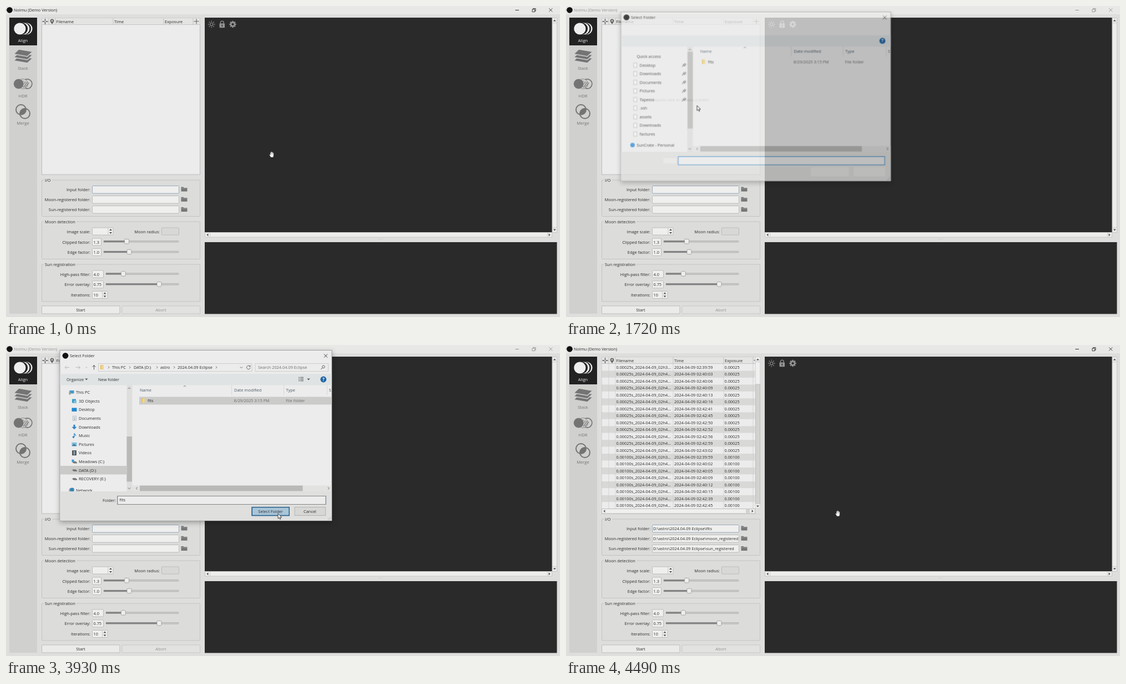
An HTML page for the animation above (5.23 s loop, 998 px wide and 561 px high).

```html
<!DOCTYPE html>
<html lang="en">
<head>
<meta charset="utf-8">
<title>Folder selection</title>
<style>
  html, body { margin: 0; width: 100%; height: 100%; overflow: hidden; background: #dededd; }
  svg { display: block; width: 100vw; height: 100vh; }
  text { font-family: "Open Sans", "Noto Sans", sans-serif; white-space: pre; }
  #dialog { transform-origin: 342px 163px; }
  #frame { filter: drop-shadow(0 3px 5px rgba(0, 0, 0, .3)); }
</style>
</head>
<body>
<svg id="stage" viewBox="0 0 998 561"></svg>
<script>
const LOOP = 5230;
const INK = '#2c2c2c', DIM = '#6c6c6c', LINE = '#bcbcbc', PANE = '#ececec', DARK = '#2a2a2a', BASE = '#dededd', BLUE = '#2f83c5';
const NUM = 7.35;

// Drawing helpers: each returns SVG markup.
const rect = (x, y, w, h, fill, stroke = 'none', extra = '') =>
  `<rect x="${x}" y="${y}" width="${w}" height="${h}" fill="${fill}" stroke="${stroke}" ${extra}/>`;
const box = (x, y, w, h, fill = PANE, stroke = LINE, extra = '') =>
  rect(x + .5, y + .5, w - 1, h - 1, fill, stroke, extra);
const circle = (x, y, r, fill, stroke = 'none', width = 1) =>
  `<circle cx="${x}" cy="${y}" r="${r}" fill="${fill}" stroke="${stroke}" stroke-width="${width}"/>`;
const line = (d, stroke = DIM, width = 1, extra = '') =>
  `<path d="${d}" fill="none" stroke="${stroke}" stroke-width="${width}" ${extra}/>`;
const shape = (d, fill, extra = '') => `<path d="${d}" fill="${fill}" ${extra}/>`;
const text = (x, y, s, fill = INK, size = 7.45, anchor = 'start', extra = '') =>
  `<text x="${x}" y="${y}" fill="${fill}" font-size="${size}" text-anchor="${anchor}" ${extra}>${s}</text>`;
const group = (id, ...parts) => `<g id="${id}">${parts.join('')}</g>`;
const at = (x, y, body, turn = 0) => `<g transform="translate(${x} ${y}) rotate(${turn})">${body}</g>`;
const tri = (x, y, turn, fill = '#555') => at(x, y, shape('M-2.6 1.4L0-1.6 2.6 1.4z', fill), turn);
const chevron = (x, y, turn, size = 2.2, color = DIM) =>
  at(x, y, line(`M${-size} ${size / 2}L0 ${-size / 2} ${size} ${size / 2}`, color), turn);
const cross = (x, y, r, color = INK) => line(`M${x - r} ${y - r}l${2 * r} ${2 * r}m0 ${-2 * r}l${-2 * r} ${2 * r}`, color, .9);
const folder = (x, y) => shape(`M${x} ${y}h4l1 1.4h6v6.6h-11z`, '#777') + line(`M${x + .5} ${y + 2.6}h10`, '#aaa', .6);
const yellowFolder = (x, y) => rect(x - 3, y - 4, 5.5, 8, '#e5c163') + rect(x - 1, y - 3.4, 3.8, 7.6, '#f0d68c');
const rays = (n, r1, r2, width) => Array.from({ length: n }, (_, i) =>
  `<path d="M0 ${-r1}V${-r2}" stroke="#929292" stroke-width="${width}" transform="rotate(${i * 360 / n})"/>`).join('');

function titleBar() {
  return rect(0, 0, 998, 15, '#e8e8e7') + circle(6.5, 7.3, 5.4, '#111') + group('caption',
    text(14, 10.4, 'Nolmu (Demo Version)', INK, 7.4),
    line('M917.5 7.5h6.5', INK),
    line('M948 6h4.6v4.6h-4.6zM949.6 6V4.5h4.5v4.6h-1.4', INK, .9), cross(981.3, 7.3, 3));
}

function sidebar() {
  const gray = '#747474', tab = '#222', y = 140.5;
  const moons = [[37, '#eee'], [34.6, tab], [31.8, '#eee'], [28.6, tab], [25, '#eee']]
    .map(([x, fill]) => circle(x, 41, 10.6, fill)).join('');
  const layer = 'l25 4.2-9.5 8.8-24.5-4.3z';
  const layers = [90, 84, 78].map(top => shape(`M23 ${top}${layer}`, gray, 'stroke="#d0d0cf" stroke-width="1.4"')).join('');
  const hdr = circle(38.3, y, 8.6, 'none', gray, 1.6) + circle(30.5, y, 9, '#d0d0cf', gray, .8)
    + [0, 3, 6, 9].map(i => line(`M${25 + i} ${148 - i * .1}l7-${13 - i * .5}`, gray, 1.1)).join('')
    + circle(22.8, y, 9.3, gray, '#d0d0cf', .8);
  const merge = '<clipPath id="lens"><circle cx="27" cy="187" r="9"/></clipPath>'
    + `<g clip-path="url(#lens)">${circle(34, 194, 9, gray)}</g>`
    + circle(27, 187, 9, 'none', gray, 2) + circle(34, 194, 9, 'none', gray, 2);
  return rect(6, 21, 50, 534, '#d0d0cf') + rect(6, 21, 50, 50, tab) + moons + layers + hdr + merge
    + ['Align', 'Stack', 'HDR', 'Merge'].map((s, i) =>
      text(30.5, 65 + i * 49.8, s, i ? gray : '#eee', 7.6, 'middle')).join('');
}

const columns = [77, 89, 193, 284, 337];
const columnLines = (y, h, color) => columns.map(x => rect(x - .4, y, .8, h, color)).join('');

function fileList() {
  return box(64, 21, 286, 283.5) + rect(64.5, 21.5, 285, 12, '#e4e4e3') + rect(64.5, 33, 285, .8, LINE)
    + columnLines(22, 11.5, LINE)
    + line('M65.5 28h4m2 0h4M70.5 23v4m0 2v4', '#555', 1.3)
    + shape('M83 33c-1.4-2.4-3.4-4.2-3.4-6.2a3.4 3.4 0 0 1 6.8 0c0 2-2 3.8-3.4 6.2z', '#666') + circle(83, 26.8, 1.3, '#e4e4e3')
    + text(90.5, 30.8, 'Filename') + text(195, 30.8, 'Time') + text(286, 30.8, 'Exposure')
    + line('M338.5 27.7h9m-4.5-4.5v9', '#777', 1.3)
    + group('hint', text(207, 172, 'Double-click to browse a folder', '#858585', 7.5, 'middle', 'font-style="italic"'));
}

function loadedRows() {
  const sets = {
    '0.00025': '39:59 40:03 40:06 40:09 40:13 40:16 42:41 42:45 42:50 42:52 42:56 42:59 43:02',
    '0.00100': '39:59 40:02 40:05 40:09 40:12 40:15 42:39 42:45',
  };
  const rows = Object.entries(sets).flatMap(([exposure, times]) => times.split(' ').map(time => [exposure, time]));
  const body = rows.map(([exposure, time], i) => {
    const y = 34 + i * 12.47;
    return rect(64.5, y, 276, 12.5, i % 2 ? '#d8d8d7' : PANE)
      + text(90.5, y + 8.9, `${exposure}s_2024-04-09_02h${time[0]}...`, INK, NUM)
      + text(195, y + 8.9, `2024-04-09 02:${time}`, INK, NUM) + text(285.5, y + 8.9, exposure, INK, NUM);
  }).join('');
  return body + columnLines(34, 261, '#cfcfce')
    + box(64, 295, 277, 9.5, '#f0f0ef') + rect(324, 295.5, 7, 8.5, '#d2d2d1') + tri(69, 299.7, -90) + tri(336, 299.7, 90)
    + box(341, 21, 9, 274, '#d2d2d1') + rect(341.5, 21.5, 8, 49.5, '#f0f0ef') + rect(341.5, 287, 8, 7.5, '#f0f0ef')
    + rect(341.5, 30, 8, .8, LINE) + rect(341.5, 70.5, 8, .8, LINE)
    + tri(345.5, 26, 0) + tri(345.5, 291, 180) + rect(341, 295, 9, 9.5, BASE);
}

const label = (y, s, x = 152) => text(x, y, s, INK, 7.45, 'end');
const field = (y, w, value = '', h = 14, stroke = LINE) =>
  box(155, y, w, h, '#efefee', stroke, 'rx="1"') + text(157.5, y + 10, value, INK, NUM);
const spin = (x, y) => rect(x - 5, y - 6.5, .8, 13, LINE) + tri(x, y - 2.8, 0) + tri(x, y + 3, 180);
const frame = (y, h, title, gap) =>
  box(64, y, 286, h, '#dcdcdb', '#c3c3c2', 'rx="1"') + rect(68, y - 2, gap, 5, BASE) + text(70, y + 3.2, title);
const slider = (x, y, knob) =>
  rect(x, y - 1.3, 311 - x, 2.8, '#c6c6c5', '#aaa', 'stroke-width=".6" rx="1"') + rect(x, y - 1.5, knob - x, 3, '#828282')
  + rect(knob - 4, y - 4.2, 8, 8.4, '#eeeeed', '#999', 'stroke-width=".8" rx="1.5"');

function settings() {
  const folders = ['Input folder:', 'Moon-registered folder:', 'Sun-registered folder:'].map((s, i) =>
    label(334 + i * 18.2, s) + field(324 + i * 18, 157, '', 14.5, i ? LINE : '#9aabb9') + folder(315.5, 326.5 + i * 18.2)).join('');
  return frame(313.5, 66.5, 'I/O', 15) + folders
    + frame(388.5, 68.5, 'Moon detection', 59)
    + label(410, 'Image scale:') + field(399.5, 38.5) + spin(188.5, 406.5)
    + label(410, 'Moon radius:', 277) + box(280, 399.5, 32, 14, '#d8d8d7', LINE, 'rx="1"')
    + label(428.5, 'Clipped factor:') + field(418.5, 17, '1.3') + slider(176, 424.7, 217.5)
    + label(447, 'Edge factor:') + field(437, 17, '1.0') + slider(176, 443.5, 222)
    + frame(465.5, 68, 'Sun registration', 58)
    + label(486.7, 'High-pass filter:') + field(476.5, 21, '4.0') + slider(180, 483, 211.3)
    + label(505.3, 'Error overlay:') + field(495.3, 21, '0.75') + slider(180, 501.8, 276)
    + label(523.8, 'Iterations:') + field(514, 28.5, '10') + spin(178, 521)
    + box(64, 540.5, 141.5, 15, '#ebebea', LINE, 'rx="1"') + text(134.5, 551, 'Start', INK, 7.45, 'middle')
    + box(208.5, 540.5, 141.5, 15, '#e2e2e1', '#c8c8c7', 'rx="1"') + text(279, 551, 'Abort', '#929292', 7.45, 'middle');
}

const loadedPaths = () => ['fits', 'moon_registered', 'sun_registered'].map((s, i) =>
  text(157, 334 + i * 18.2, `D:\\astro\\2024.04.09 Eclipse\\${s}`, INK, 7.33)).join('');

function viewer() {
  return rect(358, 21, 626, 387.5, DARK) + rect(358, 426, 634.5, 129.5, DARK)
    + box(983.5, 21, 9.5, 388, '#ededec', '#c8c8c7') + tri(988.3, 26, 0) + tri(988.3, 404, 180)
    + rect(984, 30, 8.5, .8, '#c8c8c7') + rect(984, 399, 8.5, .8, '#c8c8c7')
    + box(358, 408, 626, 9.5, '#ededec', '#c8c8c7') + tri(363, 412.8, -90) + tri(979, 412.8, 90)
    + rect(367, 408.5, .8, 8.5, '#c8c8c7') + rect(975, 408.5, .8, 8.5, '#c8c8c7')
    + line('M671 420.5h8', '#c4c4c3', 1, 'stroke-dasharray="1 1.5"')
    + at(370.3, 33, rays(8, 4.2, 6.4, 1.2) + circle(0, 0, 2.5, 'none', '#929292', 1.2))
    + rect(384.5, 31.5, 9.6, 7.8, '#929292', 'none', 'rx="1"') + line('M386.4 32v-2a2.9 2.9 0 0 1 5.8 0v2', '#929292', 1.4)
    + circle(389.3, 34.8, 1, DARK) + rect(388.8, 35, 1, 2.4, DARK)
    + at(408.5, 33, rays(8, 3, 6.2, 2.4) + circle(0, 0, 3.4, 'none', '#929292', 2.6));
}

const drive = (x, y) => shape(`M${x - 4} ${y}l2-1.5h4l3 2v1.8h-6z`, '#777');
const page = (x, y) => box(x - 3, y - 4.5, 7, 9, '#f4f4f3', '#b0b0af', 'stroke-width=".8"');
const pin = (x, y) => line(`M${x - 3} ${y + 3}l2.5-2.5m-1-2l3.5 3.5m-2-3l2-2 2 2-2 2z`, '#777', 1.1);

function quickAccess() {
  const names = ['Desktop', 'Downloads', 'Documents', 'Pictures', 'Tapesio', '.ssh', 'assets', 'Downloads', 'factures'];
  return text(125.5, 93.2, 'Quick access') + names.map((s, i) => {
    const y = 106.2 + i * 15.65;
    return page(122.5, y) + text(131, y + 2.7, s) + (i < 5 ? pin(211, y) : '');
  }).join('') + circle(118, 251.5, 4, '#2f8fd8') + text(125.5, 254.4, 'SunCrate - Personal')
    + rect(218, 82, 9.5, 139.5, '#b9b9b8');
}

function thisPc() {
  const icon = [
    (x, y) => rect(x - 4, y - 3.5, 7, 7, '#3f9bc4') + rect(x - 1, y - 1, 5, 5, '#78bfdc'),
    (x, y) => rect(x - 4.5, y - 3.2, 9, 6.5, '#2287cf'),
    (x, y) => page(x, y) + line(`M${x - 1} ${y - 1.5}h3m-3 2h3m-3 2h3`, '#5c8db0', .8),
    (x, y) => shape(`M${x - 1.5} ${y - 4}h3v4h3l-4.5 4.5-4.5-4.5h3z`, BLUE),
    (x, y) => line(`M${x} ${y + 2.5}v-7c0 3 3 2.5 2.7 5`, BLUE, 1.2) + circle(x - 1.5, y + 2.7, 1.8, BLUE),
    (x, y) => rect(x - 4.5, y - 3.2, 9, 6.5, '#82bddb') + shape(`M${x - 4.5} ${y + 3.3}l4-4 5 4z`, '#407a9e'),
    (x, y) => rect(x - 3.8, y - 4.5, 7.6, 9, '#444') + rect(x - 1.8, y - 3.5, 3.6, 7, '#7d9bb0'),
    (x, y) => drive(x, y + 1) + rect(x - 4.5, y - 3.5, 4, 4, '#2f9bdc'), drive, drive,
  ];
  const names = ['3D Objects', 'Desktop', 'Documents', 'Downloads', 'Music', 'Pictures', 'Videos', 'Meadows (C:)', 'DATA (D:)', 'RECOVERY (E:)'];
  const computer = (x, y) => rect(x - 3.5, y - 3.5, 8, 5.5, '#3f9bd0') + rect(x - 4.5, y - 1.5, 3, 5.5, '#999');
  return rect(97.5, 218, 119.5, 15.5, '#cacac9') + computer(118, 85.5) + text(126, 88.3, 'This PC')
    + names.map((s, i) => {
      const y = 101 + i * 15.6;
      return icon[i](123, y) + text(131, y + 2.8, s);
    }).join('')
    + computer(118, 262) + circle(119, 261, 3.5, '#3585b5') + text(126, 265, 'Network')
    + rect(217.5, 165, 9.5, 81.5, '#b9b9b8');
}

function dialogChrome() {
  const crumbs = [[191, 'This PC'], [230, 'DATA (D:)'], [278, 'astro'], [309, '2024.04.09 Eclipse']];
  return line('M114 40.5h-8m3.2-3l-3.2 3 3.2 3M125.5 40.5h8m-3.2-3l3.2 3-3.2 3', '#b9b9b8')
    + chevron(145, 40.5, 180, 1.8, '#b9b9b8') + line('M158.5 44.5v-8m-3 3.2l3-3.2 3 3.2', '#555')
    + box(166, 33, 277.5, 15, PANE, '#cdcdcc') + yellowFolder(173, 40)
    + crumbs.map(([x, s]) => text(x, 43.2, s, INK, 7.36)).join('')
    + [185, 223, 272, 303, 379].map(x => chevron(x, 40.3, 90, 2)).join('')
    + chevron(424, 40.5, 180) + line('M439.4 38.4a3.3 3.3 0 1 0 .7 2.4M440 36.5v2.4h-2.4', '#555', .9)
    + box(448.5, 33, 132.5, 15, PANE, '#cdcdcc') + text(454, 43.2, 'Search 2024.04.09 Eclipse', DIM, 7.4)
    + circle(572, 39.3, 2.3, 'none', '#555', .9) + line('M570.3 41l-3 3', '#555')
    + text(109, 65, 'Organize') + tri(144.8, 62, 180) + text(166, 65, 'New folder')
    + line('M527 58.5h2m1 0h6M527 61.5h2m1 0h6M527 64.5h2m1 0h6', '#777', 1.4) + tri(545, 62, 180)
    + text(198, 283, 'Folder:', INK, 7.45, 'end');
}

const selectButton = (fill, stroke) => rect(443.2, 292.7, 67, 14.8, fill, stroke, 'stroke-width="1.5"');

function dialogButtons() {
  return selectButton('#d7d7d6', BLUE) + group('buttonHover', selectButton('#c3d6e3', BLUE))
    + group('buttonDown', selectButton('#a9c5d8', '#2b5f88')) + box(519.5, 292, 56.5, 16, '#d7d7d6', '#b2b2b1')
    + group('buttonText', text(476.5, 302.8, 'Select Folder', INK, 7.45, 'middle'), text(547.5, 302.8, 'Cancel', INK, 7.45, 'middle'));
}

function dialog() {
  const row = (fill, stroke = 'none') => rect(240, 93.5, 346.5, 14, fill, stroke, 'stroke-width=".8"');
  return group('frame', rect(97, 9.5, 490, 307.5, PANE, '#8b8b8b', 'stroke-width=".7"'))
    + group('dialogIcon', circle(107, 19.3, 5.4, '#111'), text(115, 22.3, 'Select Folder', INK, 7.5), cross(576, 19.5, 3.2))
    + group('bareTitle', text(102, 22.3, 'Select Folder', INK, 7.5))
    + rect(97.4, 52, 489.2, 20.5, '#dfe3e4') + circle(571.8, 62, 5.4, '#1d65a6')
    + text(571.8, 64.9, '?', '#fff', 8, 'middle', 'font-weight="700"')
    + rect(217.5, 72.5, 10, 192, '#dededd') + group('quick', quickAccess()) + group('pc', thisPc())
    + chevron(222, 78, 0) + chevron(222, 258.5, 180)
    + text(241, 83.6, 'Name', '#4c5a66') + text(411, 83.6, 'Date modified', '#4c5a66') + text(504.5, 83.6, 'Type', '#4c5a66')
    + text(581.7, 83.6, 'S', '#4c5a66') + [406, 500, 578].map(x => rect(x, 72.5, .8, 18, '#d2d2d1')).join('') + chevron(322, 74.2, 0, 2)
    + group('rowHover', row('#d7e3eb')) + group('rowSelected', row('#bad0df', '#8fb5d0')) + group('rowInactive', row('#cbcbca'))
    + yellowFolder(247, 100) + text(255, 103, 'fits') + text(410.5, 103, '8/29/2025 3:15 PM', DIM, NUM) + text(504, 103, 'File folder', DIM)
    + rect(228, 253.5, 358.5, 10.5, '#e2e2e1') + rect(241, 253.5, 293.5, 10, '#b9b9b8') + chevron(235.5, 258.5, -90) + chevron(581, 258.5, 90)
    + rect(97.4, 264, 489.2, 52.6, '#dfdfde')
    + group('blanks', rect(174, 275, 24, 10, '#e8e8e7'), rect(442, 291.5, 69, 17, '#e8e8e7'), rect(519, 291.5, 58, 17, '#e8e8e7'))
    + group('controls', dialogChrome(), dialogButtons())
    + box(200.5, 272, 376, 16, PANE, BLUE) + group('fieldBlur', box(200.5, 272, 376, 16, PANE, '#858585'))
    + group('fieldText', text(204.5, 282.3, 'fits'))
    + line('M580 315.5l6-6m-3 6l3-3', '#999', .9, 'stroke-dasharray="1.2 .8"');
}

function cursors() {
  const hand = shape('M-2 5L-4.6 .8c-.6-1.2 .8-1.6 1.6-.2V-3.4c0-1 1.4-1 1.5 0V-4.7c.1-1 1.5-1 1.6 0V-4.2c.2-1 1.5-.8 1.5 .2V-3c.4-.8 1.6-.5 1.6 .4V2L2.4 5z', '#f4f4f4', 'stroke="#222" stroke-width=".5"')
    + line('M-1.4-3v2.4M.1-3.6v3M1.7-3v2.4', '#777', .5);
  const ring = circle(0, .8, 4, '#f5f9fc', '#2f8fd8', 2.4)
    + group('spinner', line('M0-4a4 4 0 0 1 4 4', '#65b4ea', 2));
  return group('cursor', group('hand', hand),
    group('arrow', shape('M0 0V9.2L2.2 7.3 3.6 10.4 5 9.8 3.7 6.8H6.5z', '#f6f6f6', 'stroke="#222" stroke-width=".8"')),
    group('busy', ring));
}

document.getElementById('stage').innerHTML = rect(0, 0, 998, 561, BASE) + titleBar() + sidebar() + fileList() + settings()
  + viewer() + group('loaded', loadedRows(), loadedPaths()) + group('dialog', dialog()) + cursors();

// Holds each [time, properties] step until the next one.
function play(id, steps) {
  const keys = steps.map(([time, props]) => ({ offset: time / LOOP, easing: 'step-end', ...props }));
  keys.push({ ...keys[keys.length - 1], offset: 1 });
  document.getElementById(id).animate(keys, { duration: LOOP, iterations: Infinity });
}
const fade = (id, steps) => play(id, steps.map(([time, opacity]) => [time, { opacity }]));
const show = (id, from, to = LOOP) => fade(id, [[0, 0], [from, 1], [to, 0]]);

const path = [
  [0, 479, 268], [210, 474, 265], [280, 455, 257], [350, 420, 243], [420, 376, 226], [490, 326, 207],
  [560, 285, 193], [630, 257, 185], [700, 242, 182], [770, 238, 180], [900, 236, 179.5],
  [2190, 240, 172], [2260, 250, 146], [2320, 258, 124], [2390, 261.3, 112], [2460, 262, 102],
  [2850, 265, 107], [2980, 288, 128], [3110, 352, 180], [3310, 441, 246], [3440, 461, 269],
  [3510, 476, 286], [3580, 485, 297], [3650, 489, 302], [3720, 490, 304],
];
play('cursor', path.map(([time, x, y]) => [time, { transform: `translate(${x}px, ${y}px)` }]));
play('spinner', [0, 1250, 1320, 1390, 1450, 1520].map((time, i) => [time, { transform: `translateY(.8px) rotate(${i * 55}deg)` }]));
fade('hand', [[0, 1], [490, 0], [4350, 1]]);
fade('arrow', [[0, 0], [490, 1], [1180, 0], [1590, 1], [4350, 0]]);
show('busy', 1180, 1590);

fade('caption', [[0, 1], [1180, .45], [4350, 1]]);
play('dialog', [[0, 0, .98], [1590, .4, .982], [1720, .77, .992], [1790, 1, 1], [4140, .92, .996], [4210, .69, .988], [4280, .28, .98], [4350, 0, .98]]
  .map(([time, opacity, scale]) => [time, { opacity, transform: `scale(${scale})` }]));
show('quick', 0, 1920);
show('pc', 1920);
show('blanks', 0, 1790);
show('controls', 1790);
show('rowHover', 2460, 2720);
show('rowSelected', 2720, 3860);
show('rowInactive', 3860);
show('fieldText', 2720);
show('fieldBlur', 2850);
show('buttonHover', 3580, 3860);
show('buttonDown', 3860);
show('dialogIcon', 0, 4140);
show('bareTitle', 4140);
show('hint', 0, 4420);
show('loaded', 4420);
</script>
</body>
</html>
```
